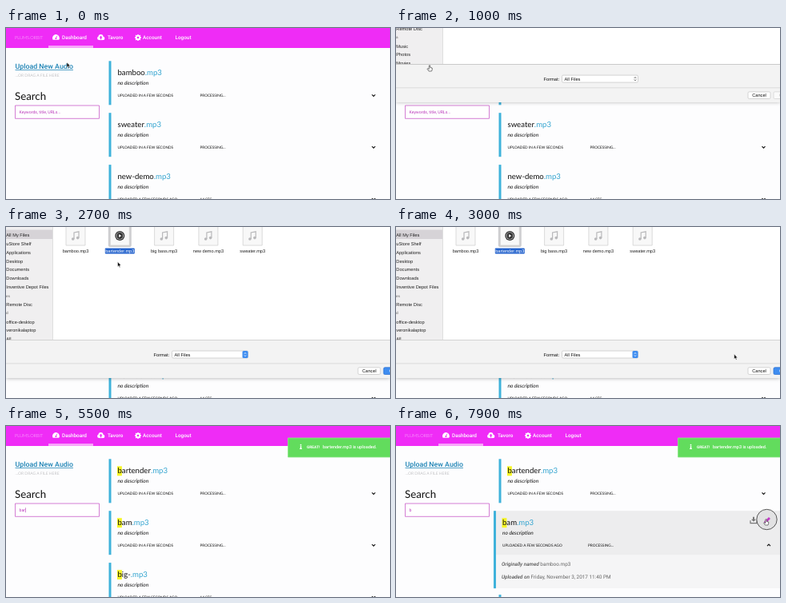
An HTML page with a canvas for the animation above (8 s loop, 480x214 px).

```html
<!DOCTYPE html>
<html lang="en">
<head>
<meta charset="utf-8">
<title>Audio dashboard</title>
<style>
html, body { margin: 0; width: 100%; height: 100%; overflow: hidden; background: #fdfdfe; }
canvas { display: block; width: 480px; height: 214px; }
</style>
</head>
<body>
<canvas></canvas>
<script>
const LOOP = 8000, W = 480, H = 214;
const PINK = '#ef2cf6', BLUE = '#3fb2db', INK = '#111', PURPLE = '#b936ba';
const canvas = document.querySelector('canvas');
const c = canvas.getContext('2d');
const scale = window.devicePixelRatio || 1;
canvas.width = W * scale;
canvas.height = H * scale;

const LATO = 'Lato, sans-serif', ROBOTO = 'Roboto, sans-serif';
const SYSTEM = '"Liberation Sans", Arial, sans-serif';

function ease(t, from, to) {
  const k = Math.min(1, Math.max(0, (t - from) / (to - from)));
  return k * k * (3 - 2 * k);
}

function rect(x, y, w, h, fill, stroke, radius = 0) {
  c.beginPath();
  c.roundRect(x, y, w, h, radius);
  if (fill) { c.fillStyle = fill; c.fill(); }
  if (stroke) { c.strokeStyle = stroke; c.lineWidth = 0.8; c.stroke(); }
}

function disc(x, y, r, fill) {
  c.beginPath();
  c.arc(x, y, r, 0, 7);
  c.fillStyle = fill;
  c.fill();
}

function line(points, color, width = 1) {
  c.beginPath();
  points.forEach(([x, y]) => c.lineTo(x, y));
  c.strokeStyle = color;
  c.lineWidth = width;
  c.stroke();
}

// Draws text on its baseline and returns the x where it ends.
function text(str, x, y, font, color, align = 'left') {
  c.font = font;
  c.fillStyle = color;
  c.textAlign = align;
  c.fillText(str, x, y);
  return x + c.measureText(str).width;
}

function shape(path, x, y, fill, stroke, width = 0.6) {
  c.save();
  c.translate(x, y);
  const p = new Path2D(path);
  c.fillStyle = fill;
  c.fill(p);
  if (stroke) { c.strokeStyle = stroke; c.lineWidth = width; c.stroke(p); }
  c.restore();
}

function header() {
  rect(0, 0, W, 25, PINK);
  rect(53, 22, 56, 3, '#f8a4fb');
  text('PLUMS.ORBIT', 11, 14, '300 5.6px ' + LATO, '#fbc5fc');
  [['Dashboard', 70], ['Tavoro', 127], ['Account', 171], ['Logout', 211.5]]
    .forEach(([s, x]) => text(s, x, 14, '500 6.4px ' + ROBOTO, '#fff'));

  c.beginPath();
  c.arc(62.4, 12.5, 4.4, 2.6, 6.82);
  c.closePath();
  c.fillStyle = '#fff';
  c.fill();
  line([[62.4, 13.4], [63.8, 9.8]], PINK, 0.8);
  disc(62.4, 13, 1, PINK);

  disc(116.4, 12.8, 2.3, '#fff');
  disc(118.5, 11, 3, '#fff');
  disc(121.2, 12.9, 2.2, '#fff');
  rect(116.4, 12, 4.8, 3.1, '#fff');
  shape('M0 -2.4L2 0H.7V2H-.7V0H-2Z', 118.6, 12.2, PINK);

  for (let i = 0; i < 8; i++) {
    const a = i * Math.PI / 4, dx = Math.cos(a), dy = Math.sin(a);
    line([[165 + dx * 2, 12 + dy * 2], [165 + dx * 4, 12 + dy * 4]], '#fff', 1.6);
  }
  disc(165, 12, 3, '#fff');
  disc(165, 12, 1.3, PINK);
}

function sidebar(t) {
  const end = text('Upload New Audio', 11.5, 51, '500 8.8px ' + ROBOTO, '#1d83b5');
  rect(11.5, 52.3, end - 11.5, 0.8, '#1d83b5');
  text('...OR DRAG A FILE HERE', 11.5, 60.5, '5px ' + LATO, '#c3c3c6');
  text('Search', 11, 90, '13.3px ' + LATO, INK);
  rect(11.5, 97, 105, 16.3, '#fff', '#c95fc9');
  const query = typed(t);
  const tail = text(query || 'Keywords, title, URLs...', 16.5, 107, '5.2px ' + ROBOTO, PURPLE);
  if (query && t < 6400) rect(tail + 0.3, 102.3, 0.6, 6, PURPLE);
}

function typed(t) {
  if (t < 4500) return '';
  if (t < 5150) return 'b';
  if (t < 5400) return 'ba';
  if (t < 6100) return 'bar';
  return t < 6250 ? 'ba' : 'b';
}

// Names in the list and how many leading letters are marked.
function listing(t) {
  if (t < 4250) return [['bamboo', 'sweater', 'new-demo'], 0];
  if (t < 4750) return [['bartender', 'bamboo', 'sweater'], 0];
  if (t >= 5650 && t < 6200) return [['bartender'], 3];
  return [['bartender', 'bam', 'big-'], 1];
}

function card(name, y, marked, recent, open = 0) {
  const x = 128.5 - 6.5 * open;
  if (open) {
    c.globalAlpha = open;
    rect(x, y, W - x, 55 + 42 * open, '#f5f5f6');
    rect(x, y, W - x, 55, '#ededee');
    c.globalAlpha = 1;
  }
  rect(x, y, 3, 55 + 42 * open, BLUE);
  const left = x + 11, title = '9.6px ' + LATO;
  if (marked) {
    c.font = title;
    rect(left - 0.5, y + 9, c.measureText(name.slice(0, marked)).width + 0.5, 12, '#f5f526');
  }
  const end = text(name, left, y + 18, title, INK);
  text('.mp3', end, y + 18, title, '#35a5d0');
  text('no description', left, y + 29.5, 'italic 6.6px ' + LATO, INK);
  const meta = '4.7px ' + LATO;
  text(recent ? 'UPLOADED IN A FEW SECONDS' : 'UPLOADED A FEW SECONDS AGO', left, y + 45, meta, INK);
  text(name === 'new-demo' || name === 'big-' ? '14 SEC.' : 'PROCESSING...',
    242.5 - 2.5 * open, y + 45, meta, INK);
  const cx = 459.5 + 6.5 * open, flip = open > 0.5 ? -1 : 1;
  line([[cx - 2, y + 43 - flip], [cx, y + 43 + flip], [cx + 2, y + 43 - flip]], INK, 1.2);
  if (open > 0.7) details(y);
}

function details(y) {
  const label = 'italic 500 6.4px ' + ROBOTO, value = '6.4px ' + ROBOTO;
  [['Originally named ', 'bamboo.mp3'], ['Uploaded on ', 'Friday, November 3, 2017 11:40 PM']]
    .forEach(([a, b], i) => {
      const x = text(a, 132, y + 69 + 16 * i, label, '#555');
      text(b, x, y + 69 + 16 * i, value, '#666');
    });
  shape('M-1 -4H1V-1H3L0 2L-3 -1H-1Z', 447, y + 11.5, '#777');
  line([[443, y + 12], [443, y + 15.5], [451, y + 15.5], [451, y + 12]], '#777', 1.2);
}

function pencil(t) {
  if (t < 7600) return;
  if (t >= 7750) {
    disc(463.5, 117, 12.7, '#e2e2e3');
    c.strokeStyle = '#333';
    c.lineWidth = 0.8;
    c.stroke();
  }
  shape('M-4 4L-3.3 1.2L2 -4L4 -2L-1.2 3.3Z', 464, 118, '#c23ac6');
}

function toast(t) {
  const a = ease(t, 4750, 4950);
  if (!a) return;
  c.globalAlpha = a;
  rect(352.5, 15, 128, 24, '#62dc5d', '#8ee58a');
  disc(368.5, 23.7, 0.9, '#fff');
  rect(367.8, 25.2, 1.5, 3.6, '#fff');
  rect(367, 28, 3, 0.9, '#fff');
  text('GREAT!', 376, 28, '700 4.8px ' + ROBOTO, '#fff');
  text('bartender.mp3 is uploaded.', 396, 28, '500 5.5px ' + ROBOTO, '#fff');
  c.globalAlpha = 1;
}

function fileIcon(name, x, selected) {
  if (selected) rect(x - 14.5, -6, 29, 31, '#cfcfd1', null, 2);
  rect(x - 12, -8, 24, 31, '#f8f8f8', '#d2d2d2');
  if (selected) {
    disc(x, 11, 6, '#333');
    disc(x, 11, 4.6, '#eee');
    disc(x, 11, 3.9, '#333');
    shape('M-1.2 -2L2 0L-1.2 2Z', x, 11, '#fff');
    rect(x - 18.5, 26.5, 37, 7, '#2463cd', null, 1);
  } else {
    line([[x - 2, 15], [x - 2, 7], [x + 4, 5.8], [x + 4, 13.5]], '#b9b9bb', 1.2);
    disc(x - 3.3, 15, 1.8, '#b9b9bb');
    disc(x + 2.7, 13.6, 1.8, '#b9b9bb');
  }
  text(name + '.mp3', x, 31.8, '5.6px ' + SYSTEM, selected ? '#fff' : '#222', 'center');
}

function dialog(t) {
  const shown = ease(t, 704, 1304) - ease(t, 3250, 3550);
  if (shown <= 0) return;
  const picked = t >= 2300, font = '5.7px ' + SYSTEM;
  c.save();
  c.translate(0, 189 * (shown - 1));
  c.shadowColor = 'rgba(0,0,0,.35)';
  c.shadowBlur = 5 * scale;
  rect(0, -30, W, 219, '#f3f3f3');
  c.shadowColor = 'transparent';
  rect(0, -30, W, 171, '#fff');
  rect(0, -30, 58, 171, '#f0eff0');
  rect(58, -30, 0.7, 171, '#d2d2d2');
  rect(0, 3.5, 58, 11.5, '#d6d3d7');
  const places = ['All My Files', 'uStore Shelf', 'Applications', 'Desktop', 'Documents',
    'Downloads', 'Inventive Depot Files', '', 'Remote Disc', '',
    ...(t < 1500 ? ['Music', 'Photos', 'Movies'] : ['office-desktop', 'veronikalaptop', 'All...'])];
  c.save();
  c.beginPath();
  c.rect(0, -30, 58, 171);
  c.clip();
  places.forEach((s, i) => text(s, 0.3, 12 + 10.85 * i, font, '#222'));
  text('es', 0, 88, '700 4.6px ' + SYSTEM, '#888');
  text(t < 1500 ? 'a' : 'd', 0, 109, '700 4.6px ' + SYSTEM, '#888');
  c.restore();
  ['bamboo', 'bartender', 'big bass', 'new demo', 'sweater']
    .forEach((s, i) => fileIcon(s, 87 + 55.3 * i, picked && i === 1));
  rect(0, 141, W, 0.8, '#c9c9c9');
  rect(0, 170.5, W, 0.7, '#d4d4d4');
  text('Format:', 184.5, 161.5, font, '#111');
  rect(207.5, 155, 95, 9, '#fff', '#cacaca', 1.5);
  if (picked) rect(295.5, 155, 7, 9, '#3f8df0', null, 1.5);
  text('All Files', 210.5, 161.5, font, '#111');
  const arrow = picked ? '#fff' : '#444';
  line([[297.8, 158.8], [299, 157.4], [300.2, 158.8]], arrow, 0.8);
  line([[297.8, 160.4], [299, 161.8], [300.2, 160.4]], arrow, 0.8);
  rect(440, 175.8, 28, 8.7, '#fff', '#cacaca', 1.5);
  text('Cancel', 454, 182.2, font, '#111', 'center');
  rect(472, 175.8, 28, 8.7, picked ? '#3f8df0' : '#fafafa', picked ? '#2f75d5' : '#d5d5d5', 1.5);
  text('Open', 479, 182.2, font, picked ? '#fff' : '#bbb');
  c.restore();
}

// time, x, y
const TRAIL = [[0, 76, 43], [300, 76, 43], [800, 42, 47], [1250, 42, 47], [1900, 142, 14],
  [2400, 142, 14], [2700, 139.5, 43.5], [3100, 474, 180], [3300, 474, 180], [3900, 84, 111],
  [4200, 84, 111], [6450, 84, 98], [6900, 84, 98], [7350, 459, 149], [7550, 459, 149],
  [7800, 462.5, 117], [8000, 462.5, 117]];

function pointer(t) {
  if (t >= 4500 && t < 6400) return;
  const i = TRAIL.findIndex(k => k[0] > t), [a, x0, y0] = TRAIL[i - 1], [b, x1, y1] = TRAIL[i];
  const k = ease(t, a, b), x = x0 + (x1 - x0) * k, y = y0 + (y1 - y0) * k;
  const overField = t > 3600 && x > 11 && x < 117 && y > 96 && y < 114;
  const overLink = (t > 400 && t < 1300) || t > 7300;
  if (overField) {
    line([[x, y - 3], [x, y + 3]], '#222', 0.8);
    line([[x - 1.5, y - 3.2], [x + 1.5, y - 3.2]], '#222', 0.7);
    line([[x - 1.5, y + 3.2], [x + 1.5, y + 3.2]], '#222', 0.7);
  } else if (overLink) {
    shape('M-.7 0Q0 -.9 .7 0V2.4L3.2 3V5.2L2.5 7H-1L-3 4.2Q-2.6 3.2 -1.6 4L-.7 4.6Z', x, y, '#fff', '#222');
  } else {
    shape('M0 0V6.2L1.4 5L2.4 7.2L3.4 6.7L2.5 4.6H4.3Z', x, y, '#111', '#fff', 0.5);
  }
}

function draw(t) {
  c.setTransform(scale, 0, 0, scale, 0, 0);
  c.textRendering = 'geometricPrecision';
  rect(0, 0, W, H, '#fdfdfe');
  header();
  sidebar(t);
  const open = ease(t, 7500, 7700), [names, marked] = listing(t);
  names.forEach((name, i) => {
    const recent = i === 0 || (i === 1 && t < 6200);
    card(name, 41.3 + 64.9 * i + (i === 2 ? 40 * open : 0), marked, recent, i === 1 ? open : 0);
  });
  pencil(t);
  toast(t);
  dialog(t);
  pointer(t);
}

const start = performance.now();
function tick() {
  draw((performance.now() - start) % LOOP);
  requestAnimationFrame(tick);
}
tick();
</script>
</body>
</html>
```
